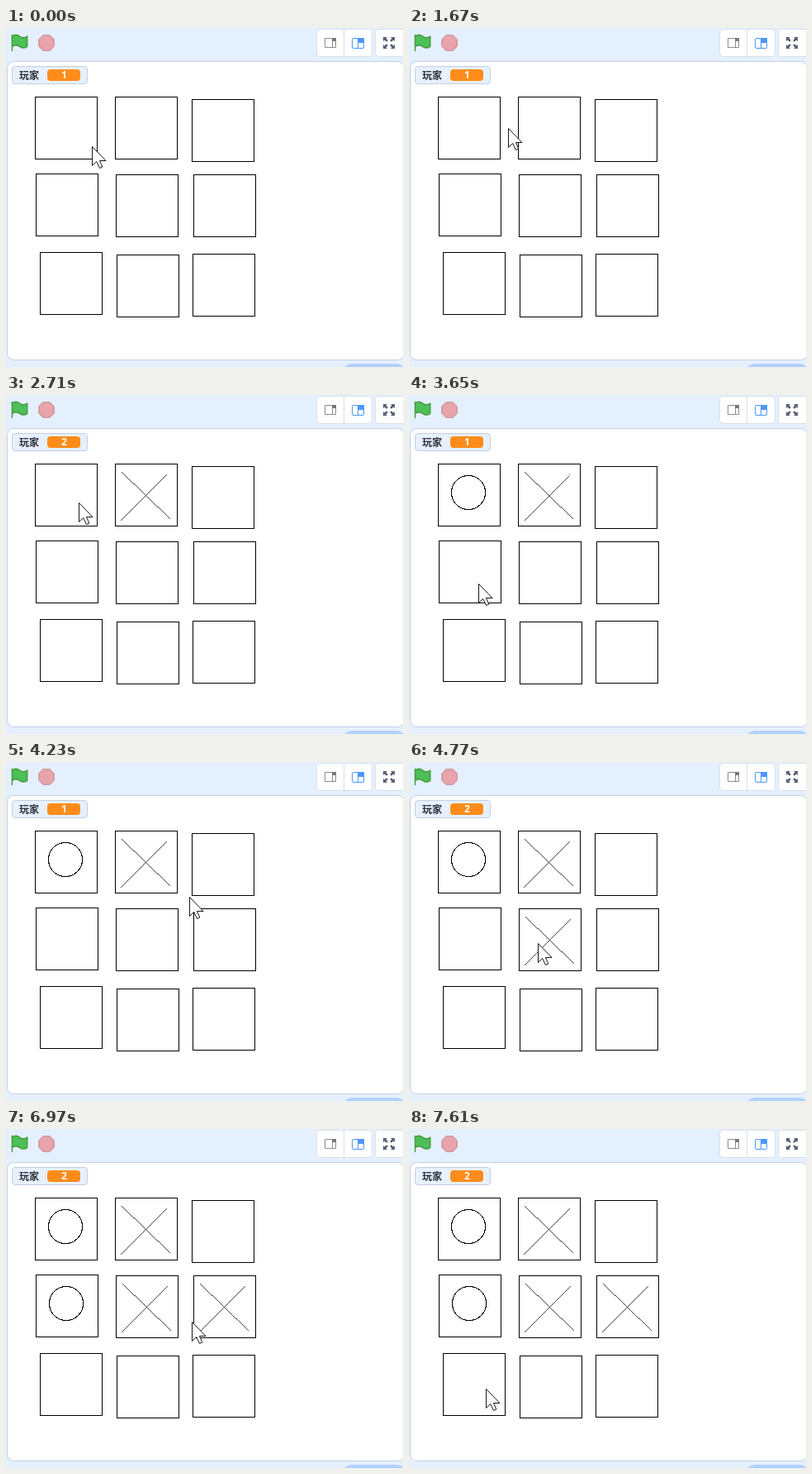
These frames come from a looping animation (481 by 410 pixels, 8 s). An HTML page:

```html
<!DOCTYPE html>
<html lang="zh">
<head>
<meta charset="utf-8">
<title>Noughts and crosses</title>
<style>
  html, body { margin: 0; width: 100%; height: 100%; overflow: hidden; background: #e5f0ff; }
  svg { display: block; }
  .panel { fill: #fff; stroke: #d9dfe8; }
  .board { fill: none; stroke: #000; shape-rendering: crispEdges; }
  .X { stroke-width: .72; }
  text { font: 700 12px "Noto Sans CJK SC", "Noto Sans CJK", "Noto Sans", sans-serif; }
  #score { font: 700 12px "Open Sans", "Noto Sans", sans-serif; fill: #fff; text-anchor: middle; }
</style>
</head>
<body>
<svg width="481" height="410" viewBox="0 0 481 410">
  <!-- run controls -->
  <rect id="glow" x="1" y="2" width="32" height="32" rx="4" fill="#4c97ff" fill-opacity=".2"/>
  <g transform="translate(6.5 7.6) scale(1.19)" stroke="#45993d" stroke-width="1.2" stroke-linecap="round" stroke-linejoin="round">
    <path fill="#4cbf56" d="M.75 2A6.44 6.44 0 0 1 8.44 2a6.44 6.44 0 0 0 7.69 0V12.4a6.44 6.44 0 0 1-7.69 0a6.44 6.44 0 0 0-7.69 0"/>
    <path d="M.75 16.75V.75"/>
  </g>
  <path id="stop" transform="translate(39 8) scale(1.4286)" fill="#ec5959" stroke="#b84848" stroke-linejoin="round"
    d="M4.3.5H9.7L13.5 4.3V9.7L9.7 13.5H4.3L.5 9.7V4.3Z"/>

  <!-- view buttons -->
  <rect class="panel" x="376.5" y="1.5" width="67" height="33" rx="4"/>
  <path class="panel" d="M409.5 2V34"/>
  <rect class="panel" x="447.5" y="1.5" width="40" height="33" rx="4"/>
  <g fill="none" stroke="#8c8c90">
    <path d="M386.5 12.5H399.5V23.5H386.5ZM395.5 12V24"/>
    <path fill="#77777c" stroke="none" d="M395 12h5v4h-5z"/>
  </g>
  <g fill="none" stroke="#4c97ff">
    <rect x="419.5" y="12.5" width="14" height="12" rx="1.5"/>
    <path d="M426.5 12V25"/>
    <path fill="#4c97ff" stroke="none" d="M426 12h8v6h-8z"/>
  </g>
  <g id="arrows" transform="translate(464 18)" fill="#575e75"></g>

  <!-- stage -->
  <rect x="1.5" y="40.5" width="481" height="361" rx="8" fill="#fff" stroke="#c3cfdf"/>
  <rect x="406" y="406" width="80" height="30" rx="14" fill="#b0d0ff"/>
  <rect x="7.5" y="46.5" width="91" height="21" rx="3.5" fill="#e6f0ff" stroke="#c3cfdf"/>
  <text x="16" y="61.5" fill="#2e3038">玩家</text>
  <rect x="50" y="50" width="40" height="14" rx="4" fill="#ff8c1a"/>
  <text id="score" x="70.5" y="61.3">1</text>
  <g id="board" class="board"></g>
  <path id="cursor" fill="#fff" stroke="#15151c" d="M.5.5V23.5L5.7 18.5L9.5 26.5L12.8 25L9.4 17.5H17Z"/>
</svg>
<script>
const LOOP = 8000;
const STEP = 128; // the pointer moves in hard steps of this length
const $ = id => document.getElementById(id);

// hand-placed squares, row by row
const cells = [
  [35, 83], [132, 83], [225, 86],
  [36, 176], [133, 177], [227, 177],
  [41, 271], [134, 274], [226, 273]
];

// players alternate, X first
const moves = [
  { time: 2070, cell: 1 }, { time: 2980, cell: 0 }, { time: 4770, cell: 4 },
  { time: 5920, cell: 3 }, { time: 6970, cell: 5 }
];

// each glide starts at a time and eases to a stop in a number of steps
const home = [104, 143];
const glides = [
  { time: 150, steps: 3, to: [85, 123] },
  { time: 1670, steps: 1, to: [120, 121] },
  { time: 1798, steps: 2, to: [174, 128] },
  { time: 2340, steps: 4, to: [73, 130] },
  { time: 3250, steps: 2, to: [84, 241] },
  { time: 3650, steps: 2, to: [84, 220] },
  { time: 4080, steps: 2, to: [222, 163] },
  { time: 4380, steps: 2, to: [156, 219] },
  { time: 4900, steps: 5, to: [77, 226] },
  { time: 6220, steps: 2, to: [264, 210] },
  { time: 6970, steps: 6, to: [93, 314] }
];

const shapes = {
  X: 'M8 10L66.5 66.5M62.5 13L6.5 69',
  O: 'M16.5 35a20.5 20.5 0 1 0 41 0a20.5 20.5 0 1 0 -41 0'
};

function addPath(parent, d, transform, name = '') {
  const path = document.createElementNS('http://www.w3.org/2000/svg', 'path');
  path.setAttribute('d', d);
  path.setAttribute('transform', transform);
  path.setAttribute('class', name);
  return parent.appendChild(path);
}

const at = cell => `translate(${cells[cell]})`;
cells.forEach((_, i) => addPath($('board'), 'M.5.5h75v75h-75z', at(i)));
const marks = moves.map(({ cell }, i) => {
  const name = 'XO'[i % 2];
  return addPath($('board'), shapes[name], at(cell), name);
});
for (let i = 0; i < 4; i++)
  addPath($('arrows'), 'M7-7V-2L5.4-3.6L3-1.2L1.2-3L3.6-5.4L2-7Z', `rotate(${i * 90})`);

const easeOut = u => 1 - (1 - u) ** 1.4;
const started = (list, t) => list.filter(({ time }) => time <= t).length;

function pointerAt(t) {
  const n = started(glides, t);
  if (!n) return home;
  const { time, steps, to } = glides[n - 1];
  const from = n > 1 ? glides[n - 2].to : home;
  const step = Math.min(steps, 1 + Math.floor((t - time) / STEP));
  const part = easeOut(step / steps);
  return from.map((v, i) => Math.round(v + (to[i] - v) * part));
}

function draw(now) {
  const t = now % LOOP;
  const played = started(moves, t);
  const running = t >= 2070 && t < 2220;
  $('cursor').setAttribute('transform', `translate(${pointerAt(t)})`);
  $('score').textContent = 1 + played % 2;
  marks.forEach((mark, i) => mark.setAttribute('visibility', i < played ? 'visible' : 'hidden'));
  $('glow').setAttribute('visibility', running ? 'visible' : 'hidden');
  $('stop').setAttribute('opacity', running ? 1 : 0.5);
}

const start = performance.now();
function tick() {
  draw(performance.now() - start);
  requestAnimationFrame(tick);
}
tick();
</script>
</body>
</html>
```
